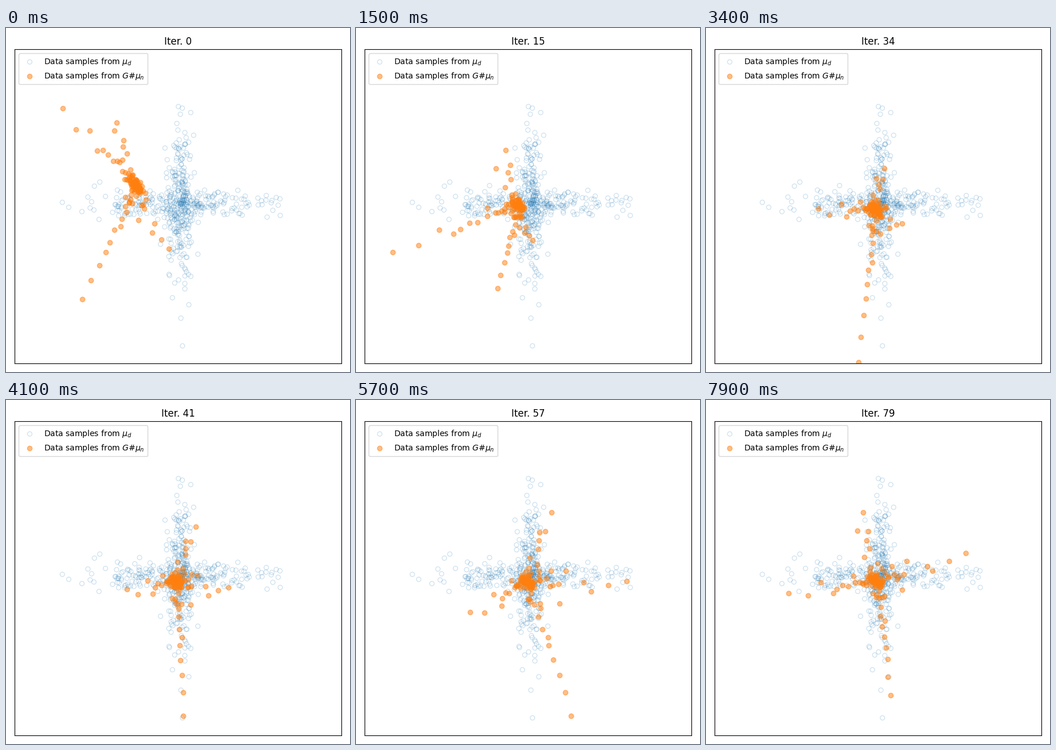
Write a matplotlib script that moves like this. It is 600x600 px and loops after 8 s.

```python
import numpy as np
import matplotlib.pyplot as plt
from matplotlib.animation import FuncAnimation

FRAMES, STEP, SIZE = 80, 100, 600
rng = np.random.default_rng(11)

# Fixed data: a cross of two long Gaussians, in stage pixels
data = np.vstack([
    rng.normal((303, 308), (12, 68), (265, 2)),
    rng.normal((299, 308), (72, 12), (265, 2)),
])

# Generator: a piecewise linear map with four arms around a moving hub.
# Each arm is the path of its tip through the key times.
TIMES = np.array([0, 1.5, 3.4, 4.8, 5.7, 7.9])
LEFT, UP, RIGHT, DOWN = range(4)
TIPS = np.array([
    [(99, 138), (63, 391), (195, 313), (212, 352), (198, 369), (143, 336)],
    [(194, 165), (262, 212), (312, 245), (345, 195), (342, 195), (275, 195)],
    [(285, 385), (308, 370), (342, 340), (436, 316), (472, 315), (454, 266)],
    [(149, 442), (254, 430), (271, 540), (350, 553), (376, 551), (319, 483)],
], float)
SLOPES = np.gradient(TIPS, TIMES, axis=1)

# Latent samples: radii shrink geometrically, inner samples fan out more
PER_ARM = 27
arm = np.repeat(np.arange(4), PER_ARM)
radius = np.tile(.84 ** np.arange(PER_ARM), 4)
fan = np.array([.15, .35, .35, .1])[arm]
angle = (arm + fan * rng.normal(size=arm.size) * (1.1 - radius)) % 4
radius[arm == DOWN] *= 1.2
ray = angle.astype(int)
mix = (angle - ray)[:, None]
jitter = rng.normal(0, 5, (arm.size, 2)) * (1 - radius.clip(0, 1))[:, None]


def hub(t):
    return np.array([297, 316]) - np.array([69, 41]) * np.exp(-t / .9)


def swing(t, start, end):
    """Smooth out-and-back pulse between two times."""
    if not start < t < end:
        return 0
    return np.sin(np.pi * (t - start) / (end - start))**2


def tips(t):
    """Cubic Hermite blend of the arm tips, plus the early overshoot."""
    i = min(np.searchsorted(TIMES, t, 'right') - 1, len(TIMES) - 2)
    h = TIMES[i + 1] - TIMES[i]
    u = (t - TIMES[i]) / h
    ease = 3 * u**2 - 2 * u**3
    p = ((1 - ease) * TIPS[:, i] + ease * TIPS[:, i + 1]
         + h * u * (1 - u)**2 * SLOPES[:, i]
         - h * u**2 * (1 - u) * SLOPES[:, i + 1])
    p[LEFT, 0] -= 80 * swing(t, 0, 1)
    p[DOWN, 0] += 430 * swing(t, 0, 1.4)
    p[DOWN, 1] += 80 * swing(t, .9, 1.45)
    return p


def generated(t):
    center = hub(t)
    arms = tips(t) - center
    blend = (1 - mix) * arms[ray] + mix * arms[(ray + 1) % 4]
    return center + radius[:, None] * blend + jitter


fig, ax = plt.subplots(figsize=(6, 6), dpi=100)
ax.set(xticks=[], yticks=[])
title = ax.set_title('Iter. 0')
fig.tight_layout()
box = ax.get_window_extent()
ax.set(xlim=(box.x0, box.x1), ylim=(SIZE - box.y0, SIZE - box.y1))

ax.scatter(*data.T, s=32, facecolors='none', edgecolors='C0', linewidths=.9,
           alpha=.22, label=r'Data samples from $\mu_d$')
dots = ax.scatter(*generated(0).T, s=36, color='C1', alpha=.5,
                  label=r'Data samples from $G\#\mu_n$')
ax.legend(loc='upper left')


def draw(i):
    dots.set_offsets(generated(i * STEP / 1000))
    title.set_text(f'Iter. {i}')
    return dots, title


anim = FuncAnimation(fig, draw, frames=FRAMES, interval=STEP, repeat=True,
                     repeat_delay=0, blit=False)
plt.show()
```
